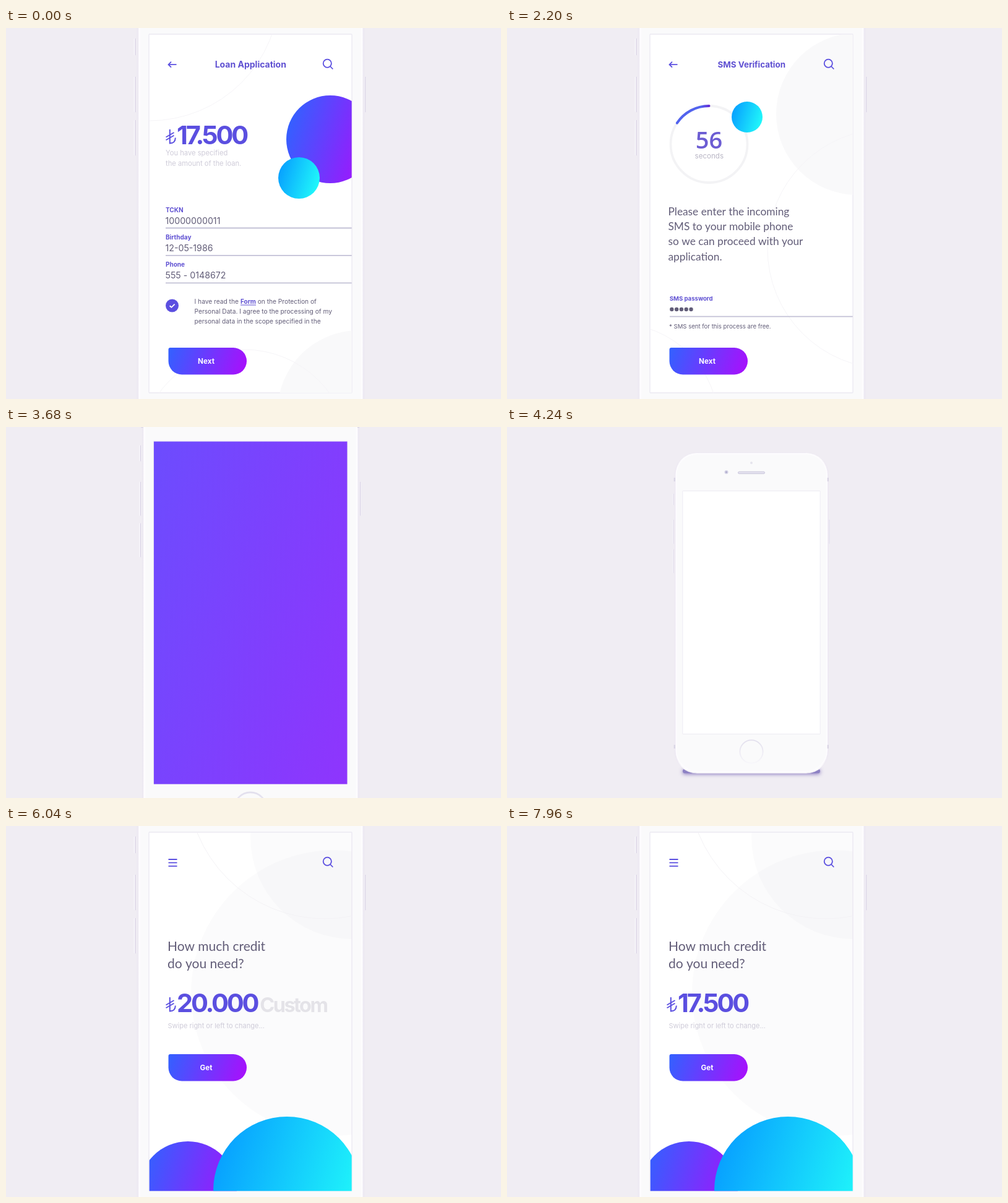
Animation, 800 px wide and 600 px high, one loop 8 s. Source, as an HTML page with a canvas:

```html
<!DOCTYPE html>
<html lang="en">
<head>
<meta charset="utf-8">
<title>Loan application flow</title>
<style>
  html, body { margin: 0; width: 100%; height: 100%; overflow: hidden; background: #f0edf3; }
  canvas { display: block; width: 800px; height: 600px; }
</style>
</head>
<body>
<canvas id="stage" width="800" height="600"></canvas>
<script>
const c = document.getElementById('stage').getContext('2d');
const LOOP = 8000, SMALL = 0.678, TAU = Math.PI * 2;
const VIOLET = '#5b4fe0', TITLE = '#5f50d2', INK = '#625d78', PALE = '#cfccd9', RULE = '#c3c1d6';
const PURPLE_STOPS = ['#355fff', '#a512fc'], CYAN_STOPS = ['#08a2ff', '#20f8fa'];
const SANS = 'Inter, sans-serif', SOFT = 'Lato, sans-serif';

const clamp = u => Math.min(1, Math.max(0, u));
const ramp = (t, from, to) => clamp((t - from) / (to - from));
const easeQuad = u => u < .5 ? 2 * u * u : 1 - 2 * (1 - u) ** 2;
const ease = (t, from, to) => { const u = ramp(t, from, to); return u < .5 ? 4 * u ** 3 : 1 - 4 * (1 - u) ** 3; };
const mix = (a, b, u) => a + (b - a) * u;
const rgb = (a, b, u) => `rgb(${a.map((v, i) => Math.round(mix(v, b[i], u)))})`;

function layer(alpha, draw) {
  if (alpha <= 0) return;
  c.save();
  c.globalAlpha *= alpha;
  draw();
  c.restore();
}
function text(str, x, y, size, color, { weight = 400, family = SANS, spacing = 0, align = 'left' } = {}) {
  c.font = `${weight} ${size}px ${family}`;
  c.letterSpacing = spacing + 'px';
  c.textAlign = align;
  c.fillStyle = color;
  c.fillText(str, x, y);
}
function line(color, width, ...points) {
  c.beginPath();
  points.forEach(([x, y]) => c.lineTo(x, y));
  c.strokeStyle = color;
  c.lineWidth = width;
  c.stroke();
}
function box(x, y, w, h, radius, fill, stroke, width = 1) {
  c.beginPath();
  c.roundRect(x, y, w, h, radius);
  if (fill) { c.fillStyle = fill; c.fill(); }
  if (stroke) { c.strokeStyle = stroke; c.lineWidth = width; c.stroke(); }
}
function disc(x, y, r, fill) {
  c.beginPath();
  c.arc(x, y, r, 0, TAU);
  c.fillStyle = fill;
  c.fill();
}
function ring(x, y, r, color, width = 1, from = 0, to = TAU) {
  c.beginPath();
  c.arc(x, y, r, from, to);
  c.strokeStyle = color;
  c.lineWidth = width;
  c.stroke();
}
function gradient(x0, y0, x1, y1, stops) {
  const g = c.createLinearGradient(x0, y0, x1, y1);
  stops.forEach((s, i) => g.addColorStop(i / (stops.length - 1), s));
  return g;
}
const ball = (x, y, r, stops) =>
  disc(x, y, r, gradient(x - r * .95, y - r * .3, x + r * .95, y + r * .3, stops));

// Phone body, measured at its zoomed-out size around the stage point (395, 300).
function phone() {
  c.save();
  c.translate(395, 300);
  c.scale(1 / SMALL, 1 / SMALL);
  c.translate(-395, -300);
  c.save();
  c.shadowColor = 'rgba(80,56,160,.75)';
  c.shadowBlur = 6;
  c.shadowOffsetY = 1;
  box(284, 553, 222, 7, 3.5, '#8d82c4');
  c.restore();
  for (const [x, y, h] of [[267.3, 108, 18.5], [267.3, 150, 39], [267.3, 197.5, 39], [519.2, 150, 39]]) {
    box(x, y, 2.6, h, 1, '#f7f5fa');
    box(x + 1.3, y, .9, h, .4, '#d8d2e4');
  }
  box(271, 41.5, 248.5, 518.5, 36, gradient(271, 0, 519.5, 0,
    ['#eeeaf3', ...Array(20).fill('#fafafb'), '#eeeaf3']), '#ece8f1', .8);
  box(273.5, 43.5, 243.5, 513.5, 34, '#fafafb', '#fdfcfe', 2);
  for (const y of [82, 514]) {
    box(269.6, y, 2.4, 6, .5, '#dad6e5');
    box(517.6, y, 2.4, 6, .5, '#dad6e5');
  }
  disc(395, 58, 2, '#e5e3ed');
  disc(354.5, 73, 3, '#d3d1e5');
  disc(354.5, 73, 1.2, '#a5a2c6');
  box(373.5, 72.2, 43, 3.4, 1.7, '#e4e1ef', '#c6c3d9', .9);
  ring(395, 525, 18.6, gradient(0, 506, 0, 544, ['#e2dfed', '#f7f6fa']), 1.8);
  c.restore();
  box(231, 10, 328, 580, 1, '#fff', '#ebe9f2', 1.3);
}

function searchIcon() {
  ring(519.3, 57.3, 6.6, VIOLET, 1.8);
  line(VIOLET, 1.8, [524, 62], [528.3, 66.5]);
}
function backIcon() {
  line(VIOLET, 1.8, [275.5, 59.2], [262.5, 59.2]);
  line(VIOLET, 1.8, [267, 54.7], [262.5, 59.2], [267, 63.7]);
}
function menuIcon() {
  for (const y of [54, 59.4, 64.8]) line(VIOLET, 1.8, [262.5, y], [276.5, y]);
}
function title(str, size) {
  text(str, 395.3, 63.5, size, TITLE, { weight: 700, align: 'center' });
}
function button(label, y) {
  box(262.5, y, 126.5, 43.5, [3, 21.7, 21.7, 21.7], gradient(266, y, 382, y + 40, PURPLE_STOPS));
  text(label, 323.5, y + 26, 11.7, '#fff', { weight: 700, align: 'center' });
}
function lira(y) {
  c.beginPath();
  c.moveTo(264.8, y - 24);
  c.lineTo(264.8, y - 1.5);
  c.quadraticCurveTo(273.5, y - 1.5, 273.8, y - 10.5);
  c.strokeStyle = VIOLET;
  c.lineWidth = 2;
  c.stroke();
  line(VIOLET, 1.8, [258.5, y - 11.5], [271.5, y - 19]);
  line(VIOLET, 1.8, [258.5, y - 6.8], [271.5, y - 14.3]);
}
function amountFont(scale) {
  return { weight: 700, spacing: -3.2 * scale };
}
function amount(str, x, y, scale, color) {
  text(str, x, y, 41.5 * scale, color, amountFont(scale));
}

function loanScreen(t) {
  const alpha = 1 - ease(t, 100, 500);
  layer(alpha, () => {
    ring(232, -60, 210, '#f5f4f7');
    disc(570, 620, 131, '#f9f9fa');
    ring(385, 690, 170, '#f5f4f7');
    title('Loan Application', 14);
    lira(188);
    amount('17.500', 276, 188, 1, VIOLET);
    text('You have specified', 258, 206, 11.2, PALE);
    text('the amount of the loan.', 258, 222.5, 11.2, PALE);
    const fields = [['TCKN', '10000000011'], ['Birthday', '12-05-1986'], ['Phone', '555 - 0148672']];
    fields.forEach(([label, value], i) => {
      const y = 297.5 + i * 44.4;
      text(label, 258, y, 10, TITLE, { weight: 700 });
      text(value, 257.5, y + 19, 14.2, INK);
      line(RULE, 1.8, [258, y + 26], [560, y + 26]);
    });
    disc(268.5, 449, 10.5, VIOLET);
    line('#fff', 1.9, [264.6, 449.2], [267.4, 451.8], [272.6, 446.6]);
    text('I have read the', 304.5, 446, 10.2, INK);
    text('Form', 379, 446, 10, TITLE, { weight: 700 });
    line(TITLE, 1, [379, 448], [404, 448]);
    text('on the Protection of', 406.7, 446, 10.2, INK);
    text('Personal Data. I agree to the processing of my', 304.5, 462, 10.2, INK);
    text('personal data in the scope specified in the', 304.5, 478, 10.2, INK);
  });
}

function smsScreen(t) {
  const shown = ease(t, 450, 900), controls = 1 - ramp(t, 2750, 3050);
  layer(shown, () => {
    disc(566, 139, 131, '#f9f9fa');
    ring(615, 357, 194, '#f5f4f7');
    ring(178, 642, 164, '#f5f4f7');
    title('SMS Verification', 13.4);
    ring(326.5, 188, 62, '#f3f3f5', 3.8);
    const span = (10 + Math.max(0, t - 1040) * .04) * TAU / 360;
    c.lineCap = 'round';
    ring(326.5, 188, 62, gradient(314, 0, 328, 0, ['#5263ee', '#6425d4']), 4, -TAU / 4 - span * ramp(t, 880, 1040), -TAU / 4);
    c.lineCap = 'butt';
    const count = 60 - Math.floor(Math.max(0, t - 1040) / 250);
    text(count, 326.5, 194.5, 38, '#6c5dd3', { weight: 600, family: '"Open Sans", sans-serif', align: 'center' });
    text('seconds', 326.8, 211, 11.6, '#b9b6c5', { align: 'center' });
    ['Please enter the incoming', 'SMS to your mobile phone', 'so we can proceed with your', 'application.']
      .forEach((str, i) => text(str, 260.5, 302.5 + i * 24.4, 17.3, INK, { family: SOFT }));
    const lift = ease(t, 1250, 1450);
    layer(1 - lift, () => text('SMS password', 260.7, 459 - 10 * lift, 13.9, '#c5c2cf'));
    layer(lift, () => text('SMS password', 262.7, 450 - 9 * lift, 9.6, TITLE, { weight: 700 }));
    const typed = Math.min(7, Math.floor((t - 1500) / 130));
    for (let i = 0; i < typed; i++) disc(266.3 + i * 7.8, 455, 3.2, INK);
    line(RULE, 1.8, [263, 466.7], [560, 466.7]);
    text('* SMS sent for this process are free.', 262, 486, 9.6, INK);
  });
  layer(controls, () => { backIcon(); searchIcon(); button('Next', 517); });

  // The large disc travels to the ring and dissolves into it.
  const move = ease(t, 120, 820);
  layer(1 - ramp(t, 520, 800), () =>
    ball(mix(524, 326.5, move), mix(180, 188, move), mix(71, 63, move), PURPLE_STOPS));

  // Motion blur: the running average of several nearby moments.
  const leave = at => t < 2600 ? 0 : Math.exp((at - 3280) / 130);
  const samples = t < 2900 ? 1 : 8;
  for (let i = 0; i < samples; i++) {
    const go = leave(t + (i - (samples - 1) / 2) * 3);
    layer(1 / (i + 1), () =>
      ball(mix(473.5, 388, move) + 65 * go, mix(242.5, 144, move) - 20 * go, mix(33.5, 25, move) + 7 * go, CYAN_STOPS));
  }
}

// Exponential growth with a soft, motion-blurred rim, then a fade to white.
function purpleFlood(t) {
  if (t < 2900 || t > 4200) return;
  const r = Math.min(700, 78 * Math.exp((t - 3280) / 85));
  layer(1 - ease(t, 3560, 4040), () => {
    const rings = r > 650 ? 1 : 12;
    for (let i = 0; i < rings; i++)
      layer(1 / (rings - i), () => ball(327, 188, r * (1.08 - i * .0155), PURPLE_STOPS));
  });
}

const choices = ['5.000', '10.000', '15.000', '20.000', 'Custom'];
function carousel(t) {
  const pos = 3 * easeQuad(ramp(t, 4920, 5840)) + easeQuad(ramp(t, 6120, 6560));
  const focus = choices.map((_, i) => Math.max(0, 1 - Math.abs(i - pos)));
  const scales = focus.map(f => mix(.78, 1, f));
  const widths = choices.map((str, i) => {
    const { weight, spacing } = amountFont(scales[i]);
    c.font = `${weight} ${41.5 * scales[i]}px ${SANS}`;
    c.letterSpacing = spacing + 'px';
    return c.measureText(str).width + 4 * scales[i];
  });
  let x = 276;
  for (let i = 0; i < choices.length; i++) x -= widths[i] * clamp(pos - i);
  choices.forEach((str, i) => {
    const color = rgb([228, 227, 232], [91, 79, 224], focus[i] ** .4);
    layer(1 - clamp(pos - i), () => amount(str, x, 301, scales[i], color));
    x += widths[i];
  });
}

function creditScreen(t) {
  const shown = ease(t, 4420, 4860);
  layer(shown, () => {
    disc(530, 270, 231, 'rgba(40,30,70,.016)');
    disc(560, 18, 165, 'rgba(40,30,70,.016)');
    ring(515, -72, 222, '#f3f2f5');
    menuIcon();
    searchIcon();
    text('How much credit', 261, 202, 21, INK, { family: SOFT });
    text('do you need?', 261, 230, 21, INK, { family: SOFT });
    lira(301);
    if (t < 6760) carousel(t);
    else amount('17.500'.slice(0, Math.max(0, Math.floor((t - 6730) / 120))), 276, 301, 1, VIOLET);
    text('Swipe right or left to change...', 261.5, 326.5, 11, PALE);
    button('Get', 369);
  });
  const rise = 1 - (1 - ramp(t, 4360, 4860)) ** 3;
  ball(294, 589 + 90 * (1 - rise), 79, PURPLE_STOPS);
  ball(454, 589 + 130 * (1 - rise), 119, CYAN_STOPS);
}

function render(t) {
  c.setTransform(1, 0, 0, 1, 0, 0);
  c.fillStyle = '#f0edf3';
  c.fillRect(0, 0, 800, 600);
  const zoom = t < 4240 ? mix(1, SMALL, ease(t, 3440, 4180)) : mix(SMALL, 1, ease(t, 4240, 4880));
  c.translate(395, 300);
  c.scale(zoom, zoom);
  c.translate(-395, -300);
  phone();
  c.save();
  c.beginPath();
  c.rect(231.7, 10.7, 327, 579.6);
  c.clip();
  if (t < 3500) {
    loanScreen(t);
    smsScreen(t);
  }
  purpleFlood(t);
  if (t > 4240) creditScreen(t);
  c.restore();
}

const start = performance.now();
function tick() {
  render((performance.now() - start) % LOOP);
  requestAnimationFrame(tick);
}
tick();
</script>
</body>
</html>
```
